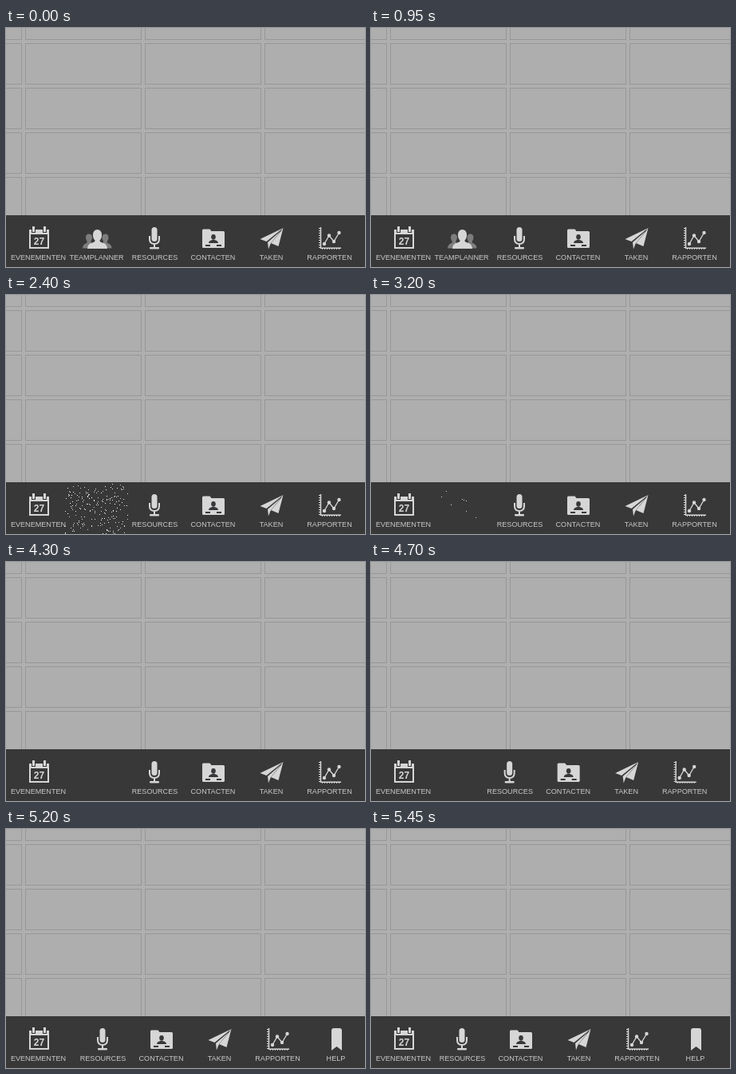
An HTML page with a canvas that plays this animation: 450x300 px, repeating every 7400 ms.

```html
<!DOCTYPE html>
<html lang="nl">
<head>
<meta charset="utf-8">
<title>Tab bar</title>
<style>
  html, body { margin: 0; width: 100%; height: 100%; overflow: hidden; background: #aeaeae; }
  svg, canvas { position: absolute; left: 0; top: 0; width: 450px; height: 300px; display: block; }
  text { font-family: "Liberation Sans", Arial, sans-serif; text-anchor: middle; fill: #c9c9c9; }
  .label { font-size: 9.1px; }
  .icon { fill: #d6d6d6; }
  .line { fill: none; stroke: #d6d6d6; }
  .hole { fill: #38383a; }
</style>
</head>
<body>
<svg viewBox="0 0 450 300">
  <defs>
    <pattern id="cells" width="150" height="56" patternUnits="userSpaceOnUse" patternTransform="translate(24 19)">
      <rect x=".5" y=".5" width="145" height="51" fill="#aeaeae" stroke="#979797"/>
    </pattern>
  </defs>
  <rect width="450" height="300" fill="#afafaf"/>
  <rect width="450" height="300" fill="url(#cells)"/>
  <rect y="235" width="450" height="65" fill="#333335" fill-opacity=".96"/>

  <g>
    <g class="icon">
      <path fill-rule="evenodd" d="M29 253h3v4h5v-4h9v4h5v-4h3v24H29zM31 259v16h21v-16z"/>
      <path d="M33 249h3v7h-3zM47 249h3v7h-3z"/>
    </g>
    <text x="41.5" y="271.5" font-size="12" font-weight="bold" style="fill:#d6d6d6">27</text>
    <text class="label" x="40.5" y="291">EVENEMENTEN</text>
  </g>

  <g id="team">
    <g fill="#7d7d7e">
      <path id="side" d="M96 276.500q0-5 5-6.500q1.500-.8.5-2.500q-1.700-2-1.500-5q.3-4 4-4t4 4q.2 3-1.500 5l1 9z"/>
      <use href="#side" transform="matrix(-1 0 0 1 228.500 0)"/>
    </g>
    <path class="icon" d="M102 277q0-6 6-7.500q4-1 3.500-3q-2.700-2.500-2.500-7q.3-6.500 5.500-6.500t5.500 6.500q.2 4.500-2.500 7q-.5 2 3.500 3q6 1.500 6 7.500z"/>
    <text class="label" x="113.500" y="291">TEAMPLANNER</text>
  </g>

  <g id="rest">
    <g>
      <rect class="icon" x="182.500" y="250" width="7" height="18" rx="3.500"/>
      <path class="line" stroke-width="2" d="M180 261v4q0 6 6 6t6-6v-4M186 271v5"/>
      <rect class="icon" x="180" y="275" width="12" height="2.500" rx="1"/>
      <text class="label" x="186.500" y="291">RESOURCES</text>
    </g>
    <g>
      <path class="icon" d="M246 254q0-1.500 1.500-1.500h8l2 2.500h15q1.500 0 1.500 1.500v18q0 1.500-1.500 1.500h-25q-1.500 0-1.500-1.500z"/>
      <g class="hole">
        <ellipse cx="260" cy="262.300" rx="2.800" ry="3.400"/>
        <path d="M254 270q0-3 4.500-4h3q4.500 1 4.500 4z"/>
        <path d="M250 272h6v2h-6zM264 272h6v2h-6z"/>
      </g>
      <text class="label" x="259.500" y="291">CONTACTEN</text>
    </g>
    <g>
      <path class="icon" d="M347.500 251L318.500 265l8 3zM347.500 251L341.500 274l-9.500-4zM346 253.500L328 269l1 8.500 2.500-6.500z"/>
      <text class="label" x="332.500" y="291">TAKEN</text>
    </g>
    <g>
      <path class="line" stroke-width="1.500" d="M394.500 250v26.300H420"/>
      <path class="line" stroke-width="2" stroke-dasharray="1 2" d="M393 251v25M396 277H420"/>
      <path class="line" stroke-width="1.300" d="M399 271L405 260.500 411 268 417.500 257"/>
      <g class="icon">
        <circle cx="399" cy="271" r="2.200"/><circle cx="405" cy="260.500" r="2.200"/>
        <circle cx="411" cy="268" r="2.200"/><circle cx="417.500" cy="257" r="2.200"/>
      </g>
      <text class="label" x="405.500" y="291">RAPPORTEN</text>
    </g>
    <g>
      <path class="icon" d="M473 253q0-3 3-3h7q3 0 3 3v25l-6.500-5-6.500 5z"/>
      <text class="label" x="478.500" y="291">HELP</text>
    </g>
  </g>
</svg>
<canvas id="dust" width="450" height="300"></canvas>

<script>
const LOOP = 7400, STEP = 50, BURST = 1450, SLIDE = 4410, SLIDE_MS = 1010;
const team = document.getElementById('team');
const rest = document.getElementById('rest');
const ctx = document.getElementById('dust').getContext('2d');

let seed = 27;
const rnd = () => (seed = (seed * 16807) % 2147483647) / 2147483647;

const dots = Array.from({ length: 800 }, () => ({
  x: 75 + rnd() * 75,
  y: 238 + rnd() * 62,
  vx: (rnd() - .5) * .008,
  vy: (rnd() - .5) * .008,
  born: BURST + rnd() * 200,
  life: 450 + 1250 * rnd() ** 4,
  size: 1.9 + rnd() * .5,
  tone: 195 + Math.round(rnd() * 60)
}));

// Cubic Bezier (.42, 0, .58, 1), solved by bisection
function easeInOut(p) {
  let lo = 0, hi = 1, s = .5;
  for (let i = 0; i < 24; i++) {
    s = (lo + hi) / 2;
    const x = 3 * (1 - s) ** 2 * s * .42 + 3 * (1 - s) * s * s * .58 + s ** 3;
    if (x < p) lo = s; else hi = s;
  }
  return s * s * (3 - 2 * s);
}

function drawDust(t) {
  ctx.clearRect(0, 0, 450, 300);
  for (const d of dots) {
    const age = t - d.born;
    if (age < 0 || age > d.life) continue;
    const x = d.x + d.vx * age, y = d.y + d.vy * age;
    const r = d.size * (1 - age / 720);
    ctx.fillStyle = `rgb(${d.tone},${d.tone},${d.tone})`;
    if (r < .7) {
      ctx.fillRect(Math.round(x), Math.round(y), 1, 1);
    } else {
      ctx.beginPath();
      ctx.arc(x, y, r, 0, 7);
      ctx.fill();
    }
  }
}

function draw(now) {
  const t = Math.floor((now % LOOP) / STEP) * STEP;
  const p = Math.min(1, Math.max(0, (t - SLIDE) / SLIDE_MS));
  const shift = p === 0 || p === 1 ? p * 72 : easeInOut(p) * 72;
  team.style.display = t < 1550 ? '' : 'none';
  rest.setAttribute('transform', `translate(${-shift.toFixed(2)} 0)`);
  drawDust(t);
}

const start = performance.now();
function tick() {
  draw(performance.now() - start);
  requestAnimationFrame(tick);
}
tick();
</script>
</body>
</html>
```
